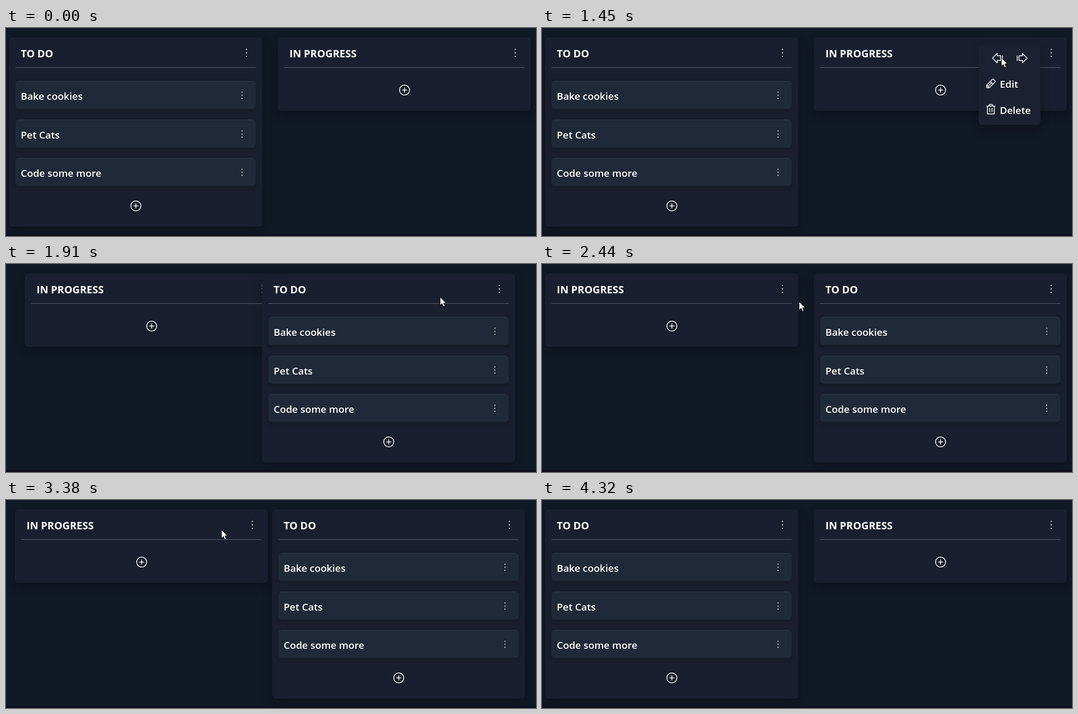
An HTML page for the animation above (4.92 s loop, 1006 px wide and 397 px high).

```html
<!DOCTYPE html>
<html lang="en">
<head>
<meta charset="utf-8">
<title>Task board</title>
<style>
  html, body { margin: 0; height: 100%; overflow: hidden; background: #111826; }
  svg { display: block; width: 1006px; height: 397px; }
  text { font: 600 18.8px "Open Sans", "Noto Sans", sans-serif; fill: #fff; }
  .title { font-weight: 700; font-size: 19.5px; }
  .panel { fill: #191f2e; filter: drop-shadow(0 9px 9px #0003); }
  .card { fill: #202937; filter: drop-shadow(0 3px 3px #0003); }
  .line { fill: none; stroke: #fff; stroke-width: 1.5; stroke-linecap: round; stroke-linejoin: round; }
  .dots { fill: #fff; }
</style>
</head>
<body>
<svg viewBox="0 0 1006 397">
  <defs>
    <g id="dots" class="dots">
      <circle cy="-6.7" r="1.15"/><circle r="1.15"/><circle cy="6.7" r="1.15"/>
    </g>
    <g id="add" class="line"><circle r="9.5"/><path d="M-4.2 0H4.2M0-4.2V4.2"/></g>
    <path id="arrow" class="line" d="M-10 0-1-9V-4.5H5.5V4.5H-1V9ZM9-4.5V4.5"/>
    <path id="pencil" class="line" d="M-8 8V3L3-8Q4-9 5-8L8-5Q9-4 8-3L-3 8ZM-1-4 4 1M-7.5 3.5-3.5 7.5M-5.5 5.5 1-1"/>
    <path id="trash" class="line" d="M-8-6H8M-3-6V-9H3V-6M-6.5-6V9H6.5V-6M-2.2-2V5M2.2-2V5"/>
  </defs>
  <rect y="393" width="1006" height="4" fill="#0b101c"/>
  <g id="board"></g>
  <path id="cursor" d="M0 0V16L3.7 12.5 6.3 18.5 9 17.3 6.4 11.5H11.5Z" fill="#fff" stroke="#000" stroke-width=".9"/>
</svg>
<script>
const $ = id => document.getElementById(id);
const LOOP = 4920, STEP = 66.5, PHASE = 48;
const LEFT = 6, GAP = 510;

const use = (id, x, y, extra = '') =>
  `<use href="#${id}" transform="translate(${x} ${y}) ${extra}"/>`;

const card = (label, y) => `
  <rect class="card" x="12" y="${y}" width="456" height="53.5" rx="6"/>
  <path d="M17 ${y + .5}H463" stroke="#2d3745"/>
  <text x="22" y="${y + 36}">${label}</text>${use('dots', 442, y + 27.4, 'scale(.87)')}`;

const column = (id, title, height, cards, overlay = '') => `
  <g id="${id}">
    <rect class="panel" y="18" width="480" height="${height}" rx="7"/>
    <text class="title" x="22" y="56">${title}</text>
    <path d="M12 75.5H468" stroke="#5b6170"/>
    ${cards.map((label, i) => card(label, 101 + Math.round(i * 73.5))).join('')}
    ${use('add', 240.5, height - 21.5)}
    <rect class="hover" x="433" y="30" width="35" height="35" rx="6" fill="#2f3848" opacity="0"/>
    <g class="kebab">${use('dots', 450.5, 47.5)}</g>
    ${overlay}
  </g>`;

const menu = `
  <g id="menu">
    <rect class="panel" x="313" y="32" width="117" height="153" rx="6" style="fill:#1b2130"/>
    ${use('arrow', 349, 57.5)}${use('arrow', 395, 57.5, 'scale(-1 1)')}
    ${use('pencil', 336, 106)}<text x="353" y="114">Edit</text>
    ${use('trash', 336, 155)}<text x="353" y="164">Delete</text>
  </g>`;

$('board').innerHTML =
  column('todo', 'TO DO', 361, ['Bake cookies', 'Pet Cats', 'Code some more']) +
  column('progress', 'IN PROGRESS', 140, [], menu);

const hover = $('progress').querySelector('.hover');
const kebab = $('progress').querySelector('.kebab');

// Pointer stops: time, x, y
const stops = [
  [180, 996, 360], [700, 965, 49], [1180, 965, 49], [1480, 868, 57], [1640, 868, 57],
  [1777, 875, 62], [2360, 488, 72], [2440, 485, 71], [2580, 457, 49], [2680, 457, 49],
  [2900, 409, 57], [3900, 409, 57], [4330, 600, 385]
];

const ramp = (t, start, length) => Math.min(1, Math.max(0, (t - start) / length));
const pulse = (t, on, off, length) => ramp(t, on, length) * (1 - ramp(t, off, length));
const cubicOut = p => 1 - (1 - p) ** 3;

function pointer(t) {
  const i = Math.max(1, stops.findIndex(s => s[0] > t));
  const [t0, x0, y0] = stops[i - 1], [t1, x1, y1] = stops[i];
  const p = ramp(t, t0, t1 - t0), e = p * p * (3 - 2 * p);
  return [x0 + (x1 - x0) * e, y0 + (y1 - y0) * e];
}

const place = (id, x, y = 0) => $(id).setAttribute('transform', `translate(${x} ${y})`);

function draw(now) {
  const t = PHASE + STEP * Math.floor((now % LOOP - PHASE) / STEP);

  const swap = cubicOut(ramp(t, 1739, 280)) - cubicOut(ramp(t, 3371, 280));
  const shift = Math.round(GAP * swap);
  place('todo', LEFT + shift);
  place('progress', LEFT + GAP - shift);
  const top = t < 3000 ? 'todo' : 'progress';
  if ($('board').lastElementChild.id !== top) $('board').append($(top));

  const lit = pulse(t, 560, 1250, 120) + pulse(t, 2510, 2740, 100);
  hover.setAttribute('opacity', lit);
  kebab.setAttribute('opacity', 1 - .4 * lit);
  $('menu').setAttribute('opacity', pulse(t, 826, 1560, 170) + pulse(t, 2640, 3190, 170));

  const visible = t > 240 && t < 4300;
  $('cursor').style.display = visible ? '' : 'none';
  if (visible) place('cursor', ...pointer(t).map(Math.round));
  requestAnimationFrame(draw);
}
requestAnimationFrame(draw);
</script>
</body>
</html>
```
